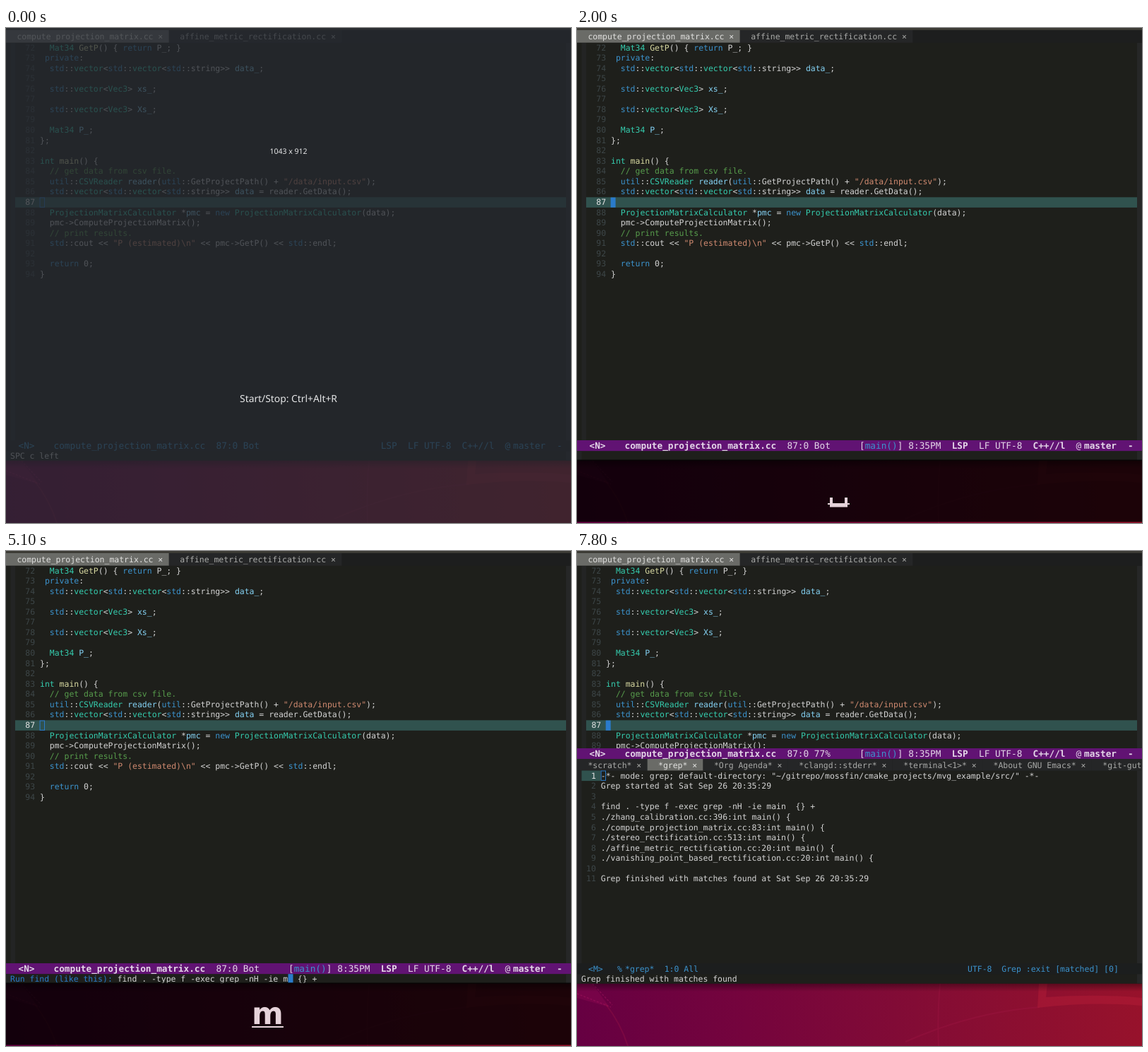
Animation of 800 by 700 pixels, one loop 8000 ms. Source, as an HTML page:

```html
<!DOCTYPE html>
<html lang="en">
<head>
<meta charset="utf-8">
<title>Editor grep session</title>
<style>
  html, body { margin: 0; width: 100%; height: 100%; overflow: hidden; background: #1e1f1b; }
  svg { display: block; width: 800px; height: 700px; }
  text { white-space: pre; text-rendering: geometricPrecision; fill: #d4d4d4;
         font: 11.467px "DejaVu Sans Mono", monospace; }
  .big { font-size: 12.74px; }
  .bold { font-weight: bold; }
  .kw { fill: #3c93cd; } .type { fill: #35cdaf; } .var { fill: #85d3f5; }
  .fn { fill: #d9daa2; } .str { fill: #d08a70; } .com { fill: #579c4c; }
  .num { fill: #3d4648; } .here { fill: #e4e4e4; }
  .dim { fill: #3c93cd; } .lit { fill: #e4d6e8; }
  .prompt { fill: #2a7bcb; }
  .tab { fill: #a9aaa8; } .tab.on { fill: #e2e2e0; }
  .key { font: bold 43px "DejaVu Sans", sans-serif; fill: #e6d3da; }
  .hint { font: 13.85px "Noto Sans", sans-serif; fill: #e6e7e8; text-anchor: middle; }
  .hint.small { font-size: 10.5px; }
</style>
</head>
<body>
<svg id="stage" viewBox="0 0 800 700" xmlns="http://www.w3.org/2000/svg">
  <defs>
    <linearGradient id="wall" gradientUnits="userSpaceOnUse" x1="0" y1="690" x2="800" y2="630">
      <stop offset="0" stop-color="#660042"/>
      <stop offset=".3" stop-color="#75043d"/>
      <stop offset=".6" stop-color="#830c35"/>
      <stop offset="1" stop-color="#97122b"/>
    </linearGradient>
    <linearGradient id="shade" x1="0" y1="0" x2="0" y2="1">
      <stop offset="0" stop-color="#000" stop-opacity=".4"/>
      <stop offset="1" stop-color="#000" stop-opacity="0"/>
    </linearGradient>
  </defs>
  <g id="desk">
    <rect y="608" width="800" height="92" fill="url(#wall)"/>
    <path d="M0 612H22L46 645L0 632Z" fill="#8a0850" opacity=".45"/>
    <path d="M0 626L48 645M22 612L50 642" stroke="#a3155f" stroke-width="1.4" stroke-dasharray="3 2" opacity=".5" fill="none"/>
    <path d="M40 640Q62 668 72 700M514 612Q510 660 512 700M465 694Q560 652 655 645" stroke="#a31a45" stroke-width="2" opacity=".3" fill="none"/>
    <path d="M654 612H666L664 631Q740 626 800 632V643Q730 637 652 646Z" fill="#b51d38" opacity=".45"/>
    <rect y="611" width="800" height="12" fill="url(#shade)"/>
  </g>
  <g id="view"></g>
</svg>
<script>
const LOOP = 8000, CW = 6.903, BIG = 7.67, LH = 14.57;
const BG = '#1e1f1b', BAND = '#30524e', BLUE = '#2a7bcb', PURPLE = '#611373';
const INK = '#e6d3da';

const code = `  Mat34 GetP() { return P_; }
 private:
  std::vector<std::vector<std::string>> data_;

  std::vector<Vec3> xs_;

  std::vector<Vec3> Xs_;

  Mat34 P_;
};

int main() {
  // get data from csv file.
  util::CSVReader reader(util::GetProjectPath() + "/data/input.csv");
  std::vector<std::vector<std::string>> data = reader.GetData();

  ProjectionMatrixCalculator *pmc = new ProjectionMatrixCalculator(data);
  pmc->ComputeProjectionMatrix();
  // print results.
  std::cout << "P (estimated)\\n" << pmc->GetP() << std::endl;

  return 0;
}`.split('\n');

const grepOut = `-*- mode: grep; default-directory: "~/gitrepo/mossfin/cmake_projects/mvg_example/src/" -*-
Grep started at Sat Sep 26 20:35:29

find . -type f -exec grep -nH -ie main  {} +
./zhang_calibration.cc:396:int main() {
./compute_projection_matrix.cc:83:int main() {
./stereo_rectification.cc:513:int main() {
./affine_metric_rectification.cc:20:int main() {
./vanishing_point_based_rectification.cc:20:int main() {

Grep finished with matches found at Sat Sep 26 20:35:29`.split('\n');

const tokens = /(?<com>\/\/.*)|(?<str>"[^"]*")|\b(?<kw>std|util|private|return|new)\b|\b(?<type>int|vector|Vec3|Mat34|CSVReader|ProjectionMatrixCalculator)\b|(?<var>data_|[xX]s_|P_(?=;$)|reader(?=\()|data(?= =)|pmc(?= =))|(?<fn>GetP(?=\(\) \{)|main)/g;

const esc = s => s.replace(/&/g, '&amp;').replace(/</g, '&lt;').replace(/>/g, '&gt;');
const span = (s, cls) => `<tspan class="${cls}">${esc(s)}</tspan>`;
const rawText = (x, y, body, cls = '') => `<text x="${x}" y="${y}" class="${cls}">${body}</text>`;
const text = (x, y, s, cls) => rawText(x, y, esc(s), cls);
const rect = (x, y, w, h, fill) => `<rect x="${x}" y="${y}" width="${w}" height="${h}" fill="${fill}"/>`;
const hollow = (x, y) => `<rect x="${x + .5}" y="${y + .5}" width="6.4" height="13.4" fill="none" stroke="${BLUE}"/>`;

function paint(line) {
  let out = '', at = 0;
  for (const m of line.matchAll(tokens)) {
    const cls = Object.keys(m.groups).find(k => m.groups[k]);
    out += esc(line.slice(at, m.index)) + span(m[0], cls);
    at = m.index + m[0].length;
  }
  return out + esc(line.slice(at));
}

function tabs(y, h, names, active) {
  let x = 0, out = rect(0, y, 800, h, '#1d1e1e');
  for (const name of names) {
    const w = (name.length + 2) * CW + 23.7, on = name === active;
    out += rect(x, y, w, h, on ? '#6a6b67' : '#252627') +
      text(x + 15.4, y + 12.9, name + ' ×', on ? 'tab on' : 'tab');
    x += w;
  }
  return out;
}

function modeline(y, on, pos) {
  const base = on ? 'big lit' : 'big dim', strong = on ? base + ' bold' : base;
  const put = (x, s, cls = base) => text(x, y + 12, s, cls);
  return rect(0, y, 800, 15.4, on ? PURPLE : '#1c1e1e') +
    put(17.5, '<N>', strong) + put(67.5, 'compute_projection_matrix.cc', strong) + put(297.5, pos) +
    (on ? rawText(400, y + 12, '[' + span('main()', 'dim') + ']', base) + put(469.3, '8:35PM') : '') +
    put(530.7, 'LSP', strong) + put(569, 'LF UTF-8') + put(645.5, 'C++//l', strong) +
    put(706.5, '@') + put(718, 'master', strong) + put(780, '-', strong);
}

function editor(s) {
  const left = s.split ? 41.1 : 48;
  let out = rect(0, 0, 800, 611.5, BG) + rect(6.5, 21, 6.5, 562, '#232424') +
    rect(793, 21, 7, 562, '#262727') + rect(13, 239.3, 780, 14.6, BAND);
  out += s.solid ? rect(left - .4, 239.6, 7, 14.2, BLUE) : hollow(left - .4, 239.5);
  code.forEach((line, i) => {
    const y = 31.5 + i * LH, n = 72 + i;
    out += text(left - 3 * CW, y, String(n), n === 87 ? 'here' : 'num') + rawText(left, y, paint(line));
  });
  return out + rect(0, 0, 800, 3, '#3c3b35') +
    tabs(3, 17.7, ['compute_projection_matrix.cc', 'affine_metric_rectification.cc'], 'compute_projection_matrix.cc') +
    (s.split ? grepPane() : modeline(583, s.active, '87:0 Bot'));
}

function grepPane() {
  let out = rect(0, 279, 800, 332.5, BG) + modeline(279, true, '87:0 77%') +
    tabs(294, 16.5, ['*scratch*', '*grep*', '*Org Agenda*', '*clangd::stderr*', '*terminal<1>*',
      '*About GNU Emacs*', '*git-gutter*'], '*grep*') +
    rect(0, 310.5, 6.5, 272.5, '#232424') + rect(793, 310.5, 7, 272.5, '#262727') +
    rect(6.5, 310.5, 27, 14.6, BAND) + hollow(33.6, 310.5);
  grepOut.forEach((line, i) => {
    const y = 321.7 + i * LH;
    out += text(13, y, String(i + 1).padStart(2), i ? 'num' : 'here') + text(33.8, y, line);
  });
  out += rect(0, 583, 800, 15.4, '#1c1e1e');
  for (const [x, str] of [[16, '<M>'], [57, '%'], [68, '*grep*'], [123.7, '1:0 All'], [553, 'UTF-8'],
    [601.3, 'Grep :exit [matched] [0]']]) out += text(x, 595, str, 'dim');
  return out;
}

function echoArea(s) {
  let out = rect(0, 598.4, 800, 13, BG) + rect(0, 598.4, 6.5, 13, '#232424') + rect(793, 598.4, 7, 13, '#262727');
  if (s.query === undefined) return out + text(6, 608.6, s.echo);
  const ask = 'Run find (like this): ', cmd = 'find . -type f -exec grep -nH -ie ' + s.query;
  return out + rect(6 + (ask + cmd).length * CW, 598.2, 7, 12.4, BLUE) +
    rawText(6, 608.6, span(ask, 'prompt') + esc(cmd + '  {} +'));
}

// Key display: "_" is the space mark, "^" the return mark
const widths = { _: 31, c: 25.5, g: 30.8, m: 44.8, a: 29, i: 14.7, n: 30.6, '^': 48 };

function keyBar(s) {
  if (!s.keys) return '';
  let x = 370.5 - [...s.keys].reduce((sum, k) => sum + widths[k], 0) / 2;
  let out = rect(0, 610.5, 800, 88, 'rgba(0,0,0,.81)');
  [...s.keys].forEach((k, i) => {
    if (k === '_') out += `<path d="M${x + 5} 664V675.6H${x + 26}V664" fill="none" stroke="${INK}" stroke-width="4"/>`;
    else if (k === '^') out += `<path transform="translate(${x + 11} 637)" d="M25 1.2H33V21.5H13V28.5L1.5 17.5L13 7.5V14H25Z" fill="none" stroke="${INK}" stroke-width="2.4"/>`;
    else out += text(x, 669, k, 'key');
    if (s.mark && i === s.keys.length - 1) out += rect(x, 672, widths[k], 2, INK);
    x += widths[k];
  });
  return out;
}

const veil = s => s.veil ? rect(0, 0, 800, 700, 'rgba(37,41,48,.76)') +
  text(400, 178, '1043 x 912', 'hint small') + text(400, 528.5, 'Start/Stop: Ctrl+Alt+R', 'hint') : '';

// Each step changes only the listed fields
const steps = [
  [0, { veil: true, echo: 'SPC c left', keys: '' }],
  [100, { veil: false }],
  [900, { active: true, solid: true }],
  [2000, { echo: '', keys: '_', mark: true }],
  [2200, { mark: false }],
  [2400, { echo: 'SPC-' }],
  [2700, { echo: 'SPC c-', keys: '_c', mark: true }],
  [2800, { mark: false }],
  [3100, { query: '', solid: false, keys: '_cg', mark: true }],
  [3300, { mark: false }],
  [4600, { keys: '' }],
  [5100, { query: 'm', keys: 'm', mark: true }],
  [5400, { query: 'ma', keys: 'ma' }],
  [5500, { query: 'mai', keys: 'mai' }],
  [5700, { query: 'main', keys: 'main' }],
  [6300, { query: undefined, echo: '', solid: true, keys: 'main^' }],
  [6400, { split: true }],
  [6500, { echo: 'Grep finished with matches found', mark: false }],
  [7800, { keys: '' }],
];

const view = document.getElementById('view');
let shown = -1;

function draw(t) {
  const n = steps.filter(([at]) => at <= t).length;
  if (n === shown) return;
  shown = n;
  const s = Object.assign({}, ...steps.slice(0, n).map(step => step[1]));
  view.innerHTML = editor(s) + echoArea(s) + keyBar(s) + veil(s);
}

const start = performance.now();
function tick() {
  draw((performance.now() - start) % LOOP);
  requestAnimationFrame(tick);
}
draw(0);
requestAnimationFrame(tick);
</script>
</body>
</html>
```
